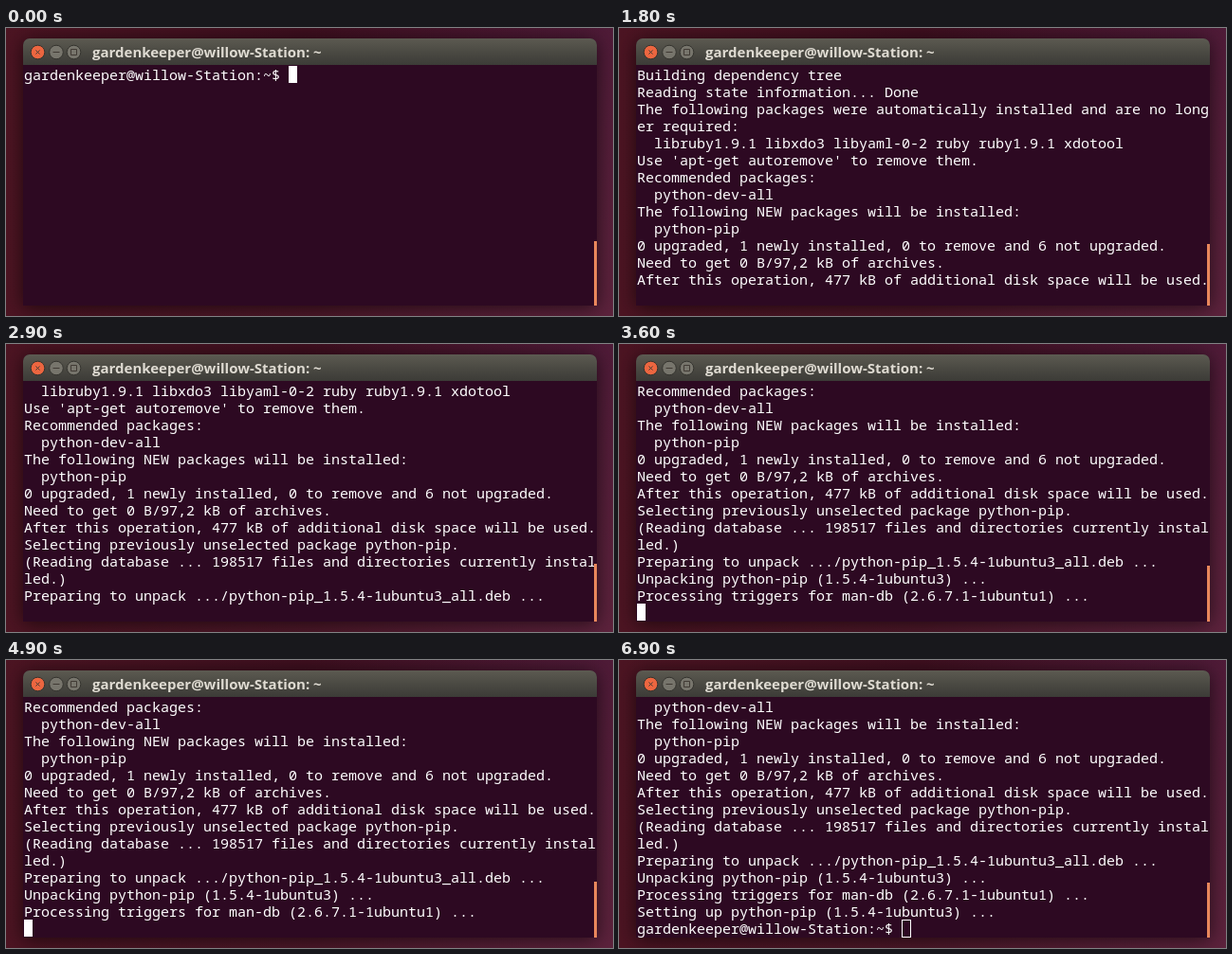
Write an HTML page with a canvas that moves like this. It is 640 px wide and 304 px high and loops after 7000 ms.

```html
<!DOCTYPE html>
<html lang="en">
<head>
<meta charset="utf-8">
<title>Terminal</title>
<style>
  html, body { margin: 0; width: 100%; height: 100%; overflow: hidden; background: #2c0a16; }
  canvas { display: block; }
</style>
</head>
<body>
<canvas id="stage" width="640" height="304"></canvas>
<script>
const ctx = document.getElementById('stage').getContext('2d');
const LOOP = 7000, ROWS = 14, CELL_W = 9, CELL_H = 18, LEFT = 19, TOP = 40;
const HISTORY = 52; // lines the scrollbar already counts at the start
const WINDOW = { x: 18, y: 11, w: 605, h: 282, bar: 28 };
const INK = '#ffffff', PAPER = '#2d0922';
const HOST = 'gardenkeeper@willow-Station';
const PROMPT = HOST + ':~$ ';
const COMMAND = 'sudo apt-get install python-pip';

// Each step rewrites the output from the given line onwards.
const steps = [
  [1000, 1, 'Reading package lists... Done', 'Building dependency tree... 0%'],
  [1200, 2, 'Building dependency tree... 50%'],
  [1400, 2, 'Building dependency tree', 'Reading state information... 0%'],
  [1600, 3,
    'Reading state information... Done',
    'The following packages were automatically installed and are no long',
    'er required:',
    '  libruby1.9.1 libxdo3 libyaml-0-2 ruby ruby1.9.1 xdotool',
    "Use 'apt-get autoremove' to remove them.",
    'Recommended packages:',
    '  python-dev-all',
    'The following NEW packages will be installed:',
    '  python-pip',
    '0 upgraded, 1 newly installed, 0 to remove and 6 not upgraded.',
    'Need to get 0 B/97,2 kB of archives.',
    'After this operation, 477 kB of additional disk space will be used.'],
  [2400, 15, 'Selecting previously unselected package python-pip.'],
  [2800, 16,
    '(Reading database ... 198517 files and directories currently instal',
    'led.)',
    'Preparing to unpack .../python-pip_1.5.4-1ubuntu3_all.deb ...'],
  [3200, 19, 'Unpacking python-pip (1.5.4-1ubuntu3) ...'],
  [3600, 20, 'Processing triggers for man-db (2.6.7.1-1ubuntu1) ...'],
  [5000, 21, 'Setting up python-pip (1.5.4-1ubuntu3) ...'],
  [6300, 22, PROMPT]
];

function terminalAt(t) {
  const typed = Math.min(COMMAND.length, Math.floor(COMMAND.length * t / 700));
  const lines = [PROMPT + COMMAND.slice(0, typed)];
  for (const [at, line, ...text] of steps) {
    if (t >= at) lines.splice(line, lines.length, ...text);
  }
  if (t >= 2500 && t < 2800) lines.push(`(Reading database ... ${(t - 2400) / 4}%`);

  const last = lines.length - 1;
  const atPrompt = t < 800 || t >= 6300;
  const progress = lines[last].endsWith('%');
  const cursor = {
    line: atPrompt || progress ? last : last + 1,
    col: atPrompt ? lines[last].length : 0,
    visible: t < 1600 || t >= 3400,
    hollow: t >= 6700
  };
  return { lines, cursor, scroll: Math.max(0, cursor.line + 1 - ROWS) };
}

function gradient(x0, y0, x1, y1, ...colors) {
  const g = ctx.createLinearGradient(x0, y0, x1, y1);
  colors.forEach((c, i) => g.addColorStop(i / (colors.length - 1), c));
  return g;
}

function drawDesktop() {
  ctx.fillStyle = gradient(0, 0, 640, 0, '#4c1422', '#3f0f1f', '#401232');
  ctx.fillRect(0, 0, 640, 304);
  ctx.fillStyle = gradient(320, 0, 640, 304, 'rgba(120,50,70,0)', 'rgba(120,50,70,.5)');
  ctx.fillRect(0, 0, 640, 304);
}

function drawButton(x, fill, symbol) {
  const y = 25.5;
  ctx.beginPath();
  ctx.arc(x, y, 7.3, 0, Math.PI * 2);
  ctx.fillStyle = fill;
  ctx.fill();
  ctx.lineWidth = 1;
  ctx.strokeStyle = '#34332e';
  ctx.stroke();
  ctx.strokeStyle = '#403a34';
  ctx.stroke(new Path2D(symbol));
}

function drawWindow() {
  const { x, y, w, h, bar } = WINDOW;
  ctx.save();
  ctx.shadowColor = 'rgba(0,0,0,.6)';
  ctx.shadowBlur = 20;
  ctx.shadowOffsetY = 2;
  ctx.fillStyle = PAPER;
  ctx.beginPath();
  ctx.roundRect(x, y, w, h, [7, 7, 0, 0]);
  ctx.fill();
  ctx.restore();

  ctx.fillStyle = gradient(0, y, 0, y + bar, '#5c5a51', '#4b4a43', '#3c3b37');
  ctx.beginPath();
  ctx.roundRect(x, y, w, bar, [7, 7, 0, 0]);
  ctx.fill();

  drawButton(33.5, '#ec6640', 'M31.5 23.5l4 4m0-4l-4 4');
  drawButton(53, '#77756c', 'M49.5 25.5h7');
  drawButton(71.5, '#77756c', 'M68.5 22.5h6v6h-6z');

  ctx.font = 'bold 15px "Open Sans", sans-serif';
  ctx.fillStyle = '#dfdbd2';
  ctx.fillText(HOST + ': ~', 91, 31);
}

function drawTerminal({ lines, cursor, scroll }) {
  const rowTop = line => TOP + (line - scroll) * CELL_H;
  const write = (text, line, color) => {
    ctx.fillStyle = color;
    ctx.fillText(text, LEFT, rowTop(line) + 15);
  };
  ctx.font = '15px "Noto Sans Mono", monospace';
  lines.forEach((text, i) => { if (i >= scroll) write(text, i, INK); });

  if (cursor.visible) {
    const x = LEFT + cursor.col * CELL_W, y = rowTop(cursor.line);
    if (cursor.hollow) {
      ctx.strokeStyle = INK;
      ctx.lineWidth = 1;
      ctx.strokeRect(x + .5, y + .5, CELL_W, CELL_H);
    } else {
      ctx.fillStyle = INK;
      ctx.fillRect(x, y, CELL_W, CELL_H);
      const covered = (lines[cursor.line] || '')[cursor.col];
      if (covered) write(covered, cursor.line, PAPER);
    }
  }

  const thumb = Math.round(ROWS * ROWS * CELL_H / (HISTORY + scroll));
  ctx.fillStyle = '#e9875c';
  ctx.fillRect(620, 293 - thumb, 3, thumb);
}

function frame(now) {
  const t = Math.floor(now % LOOP / 100) * 100;
  drawDesktop();
  drawWindow();
  drawTerminal(terminalAt(t));
  requestAnimationFrame(frame);
}
frame(performance.now());
</script>
</body>
</html>
```
